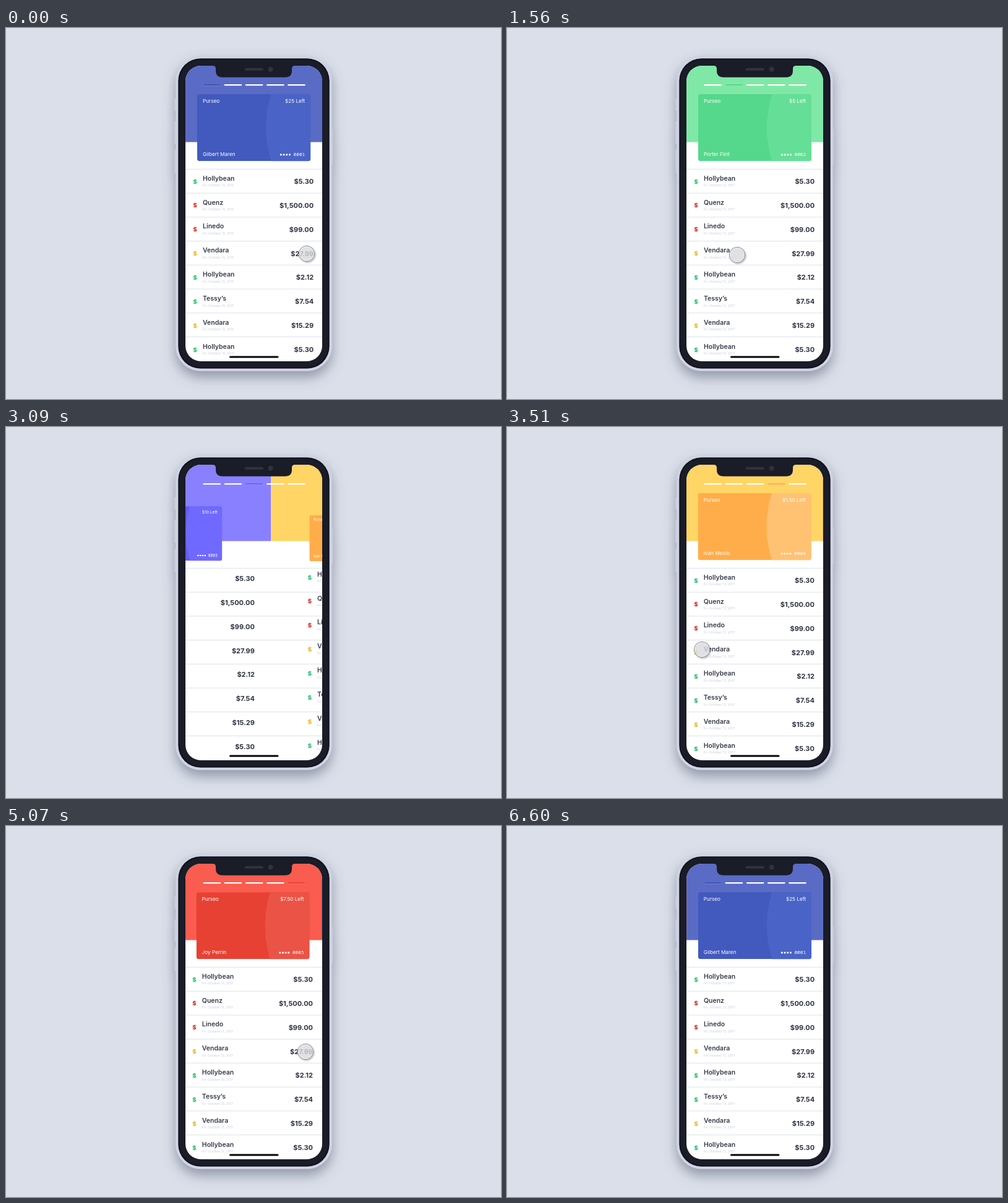
An HTML page for the animation above (6.63 s loop, 800x600 px).

```html
<!DOCTYPE html>
<html lang="en">
<head>
<meta charset="utf-8">
<title>Card swipe</title>
<style>
  html, body { margin: 0; width: 100%; height: 100%; overflow: hidden; background: #dadfe9; }
  svg { display: block; width: 800px; height: 600px; font-family: Inter, "Open Sans", sans-serif; }
  .name { font-size: 10.5px; font-weight: 600; fill: #353b4b; }
  .date { font-size: 5.2px; font-weight: 500; fill: #cfd2e4; }
  .price { font-size: 11px; font-weight: 700; fill: #2d3344; }
  .icon { font-size: 9.5px; font-weight: 800; }
  .card { font-size: 8.2px; fill: #fff; }
  .digits { font: 500 7.8px "Noto Sans Mono", "DejaVu Sans Mono", monospace; fill: #fff; }
  .end { text-anchor: end; }
  .mid { text-anchor: middle; }
</style>
</head>
<body>
<svg id="stage" viewBox="0 0 800 600">
  <defs>
    <clipPath id="screenClip"><rect x="290" y="61" width="221" height="478" rx="25"/></clipPath>
    <clipPath id="cardClip"><rect width="183.2" height="108.3" rx="4"/></clipPath>
    <filter id="shadow" x="-30%" y="-20%" width="160%" height="140%">
      <feDropShadow dx="0" dy="10" stdDeviation="10" flood-color="#50556c" flood-opacity=".52"/>
    </filter>
    <filter id="soft" x="-40%" y="-40%" width="180%" height="180%">
      <feDropShadow dx="1.5" dy="1.5" stdDeviation="1.2" flood-color="#000" flood-opacity=".3"/>
    </filter>
    <linearGradient id="rim" x2="0" y2="1">
      <stop offset="0" stop-color="#ced2e2"/>
      <stop offset="1" stop-color="#d2d4e6"/>
    </linearGradient>
  </defs>
  <rect width="800" height="600" fill="#dadfe9"/>
  <g filter="url(#shadow)">
    <g fill="#c9cddd">
      <rect x="272.5" y="114" width="4" height="20" rx="1"/>
      <rect x="272.5" y="151" width="4" height="36" rx="1"/>
      <rect x="272.5" y="197" width="4" height="38" rx="1"/>
      <rect x="524" y="163" width="4" height="59" rx="1"/>
    </g>
    <rect x="274.3" y="45.3" width="252.4" height="509.4" rx="40" fill="url(#rim)"/>
  </g>
  <rect x="278.3" y="49.3" width="244.4" height="501.4" rx="36" fill="#11131c"/>
  <rect x="280.5" y="51.5" width="240" height="497" rx="34" fill="#1a1c28"/>
  <g clip-path="url(#screenClip)">
    <rect x="290" y="61" width="221" height="478" fill="#fff"/>
    <g id="headers"></g>
    <g id="lines" fill="#dfe5ec"></g>
    <g id="bars"></g>
    <g id="pages"></g>
    <rect x="361" y="530.5" width="79.5" height="3" rx="1.5" fill="#050507"/>
    <g id="cursor" filter="url(#soft)">
      <circle r="12.6" fill="#e0e1e4" fill-opacity=".74" stroke="#85868d" stroke-width="1"/>
      <circle r="11.5" fill="none" stroke="#fff" stroke-opacity=".7" stroke-width=".8"/>
    </g>
    <path d="M334 60V61Q339 61 339 66V69Q339 79.7 350 79.7H451Q462 79.7 462 69V66Q462 61 467 61V60Z" fill="#1a1c28"/>
  </g>
  <rect x="385.5" y="64.7" width="30.5" height="4" rx="2" fill="#30323e"/>
  <circle cx="427.6" cy="66.7" r="4" fill="#30323e"/>
</svg>
<script>
const LOOP = 6630, WIDTH = 221;
const NS = "http://www.w3.org/2000/svg";
const byId = id => document.getElementById(id);

function add(parent, tag, attrs, text) {
  const node = document.createElementNS(NS, tag);
  for (const key in attrs) node.setAttribute(key, attrs[key]);
  if (text) node.textContent = text;
  return parent.appendChild(node);
}

const themes = [
  { header: "#5a6bc5", card: "#4259be", arc: "#4a63c7", bar: "#3f54b8", owner: "Gilbert Maren", left: "$25" },
  { header: "#80e8a6", card: "#55d88b", arc: "#65df97", bar: "#55d88b", owner: "Porter Flint", left: "$5" },
  { header: "#8980ff", card: "#645aff", arc: "#6f69ff", bar: "#6c62fa", owner: "Tom Hallebrand", left: "$10" },
  { header: "#ffd566", card: "#ffad4b", arc: "#ffc273", bar: "#ffad4b", owner: "Ivan Mesto", left: "$1.50" },
  { header: "#fa5c4f", card: "#e74133", arc: "#ea5345", bar: "#e74133", owner: "Joy Perrin", left: "$7.50" }
];
const GREEN = "#1fc268", RED = "#dc2d25", YELLOW = "#efb520";
const rows = [
  ["Hollybean", "$5.30", GREEN], ["Quenz", "$1,500.00", RED],
  ["Linedo", "$99.00", RED], ["Vendara", "$27.99", YELLOW],
  ["Hollybean", "$2.12", GREEN], ["Tessy’s", "$7.54", GREEN],
  ["Vendara", "$15.29", YELLOW], ["Hollybean", "$5.30", GREEN]
];

function buildCard(parent, theme, index) {
  const card = add(parent, "g");
  const face = add(card, "g", { "clip-path": "url(#cardClip)" });
  add(face, "rect", { width: 183.2, height: 108.3, fill: theme.card });
  add(face, "circle", { cx: 286, cy: 54, r: 175, fill: theme.arc });
  add(card, "text", { x: 9, y: 14, class: "card" }, "Purseo");
  add(card, "text", { x: 174.3, y: 14, class: "card end" }, theme.left + " Left");
  add(card, "text", { x: 9, y: 100, class: "card" }, theme.owner);
  for (let i = 0; i < 4; i++)
    add(card, "rect", { x: 134 + i * 4.7, y: 96.5, width: 2.8, height: 2.8, rx: .6, fill: "#fff" });
  add(card, "text", { x: 174.3, y: 100.5, class: "digits end" }, "000" + (index + 1));
  return card;
}

function buildList(parent) {
  const list = add(parent, "g");
  rows.forEach(([name, price, color], i) => {
    const row = add(list, "g", { transform: `translate(0 ${i * 38.85})` });
    add(row, "text", { x: 305.7, y: 251.6, class: "icon mid", fill: color }, "$");
    add(row, "text", { x: 318, y: 246.7, class: "name" }, name);
    add(row, "text", { x: 318, y: 256.3, class: "date" }, "Fri. October 13, 2017");
    add(row, "text", { x: 497.2, y: 252, class: "price end" }, price);
  });
  return list;
}

const pages = themes.map((theme, i) => {
  const group = add(byId("pages"), "g");
  const bar = { x: 318.4 + i * 34.2, y: 91, width: 28.6, height: 2.3, rx: 1 };
  add(byId("bars"), "rect", { ...bar, fill: "#fff" });
  return {
    group,
    header: add(byId("headers"), "rect", { y: 61, width: WIDTH + .3, height: 123.5, fill: theme.header }),
    bar: add(byId("bars"), "rect", { ...bar, fill: theme.bar }),
    card: buildCard(group, theme, i),
    list: buildList(group)
  };
});
rows.forEach((_, i) =>
  add(byId("lines"), "rect", { x: 290, y: 227.8 + i * 38.75, width: WIDTH, height: 1.1 }));

// Slightly underdamped spring, started by each swipe
const swipes = [480, 1750, 2955, 4304, 5551];
function spring(ms) {
  if (ms <= 0) return 0;
  const t = ms / 1000, decay = 7.65, freq = 4.74;
  return 1 - Math.exp(-decay * t) * (Math.cos(freq * t) + decay / freq * Math.sin(freq * t));
}

// Pointer stops: time, x, y; x = 270 is outside the screen
const stops = [
  [0, 486, 365], [200, 482, 365], [500, 270, 366], [1000, 270, 362], [1350, 480, 366],
  [1560, 372, 367], [1740, 270, 367], [2130, 270, 364], [2310, 402, 366], [2500, 483, 366],
  [2650, 481, 366], [2940, 270, 362], [3420, 270, 359], [3510, 315, 360], [3750, 484, 364],
  [4000, 482, 365], [4300, 270, 365], [4800, 270, 362], [5050, 484, 365], [5250, 482, 365],
  [5550, 270, 364], [LOOP, 270, 364]
];
function pointer(t) {
  const i = stops.findIndex(stop => stop[0] > t);
  const [t0, x0, y0] = stops[i - 1], [t1, x1, y1] = stops[i];
  const u = (t - t0) / (t1 - t0), k = u * u * (3 - 2 * u);
  return [x0 + (x1 - x0) * k, y0 + (y1 - y0) * k];
}

const clamp = v => Math.max(0, Math.min(1, v));
const show = (node, visible) => node.setAttribute("display", visible ? "inline" : "none");

function render(t) {
  const position = swipes.reduce((sum, start) => sum + spring(t - start), 0);
  pages.forEach((page, i) => {
    const d = (i - position + 7.5) % 5 - 2.5;
    const far = Math.abs(d), visible = far < 1.02;
    show(page.header, visible);
    show(page.group, visible);
    page.bar.setAttribute("opacity", clamp((.55 - far) / .15));
    if (!visible) return;
    page.header.setAttribute("x", 290 + d * WIDTH);
    page.card.setAttribute("transform",
      `translate(${309 + d * 290} ${106.9 + far * 57}) scale(${1 - far * .5})`);
    const listX = d * WIDTH * (d > 0 ? 1.34 : 1.15);
    page.list.setAttribute("transform", `translate(${listX} ${-far * 8})`);
  });
  const [x, y] = pointer(t);
  show(byId("cursor"), x > 271);
  byId("cursor").setAttribute("transform", `translate(${x} ${y})`);
}

const origin = performance.now();
function tick() {
  render((performance.now() - origin) % LOOP);
  requestAnimationFrame(tick);
}
render(0);
requestAnimationFrame(tick);
</script>
</body>
</html>
```
